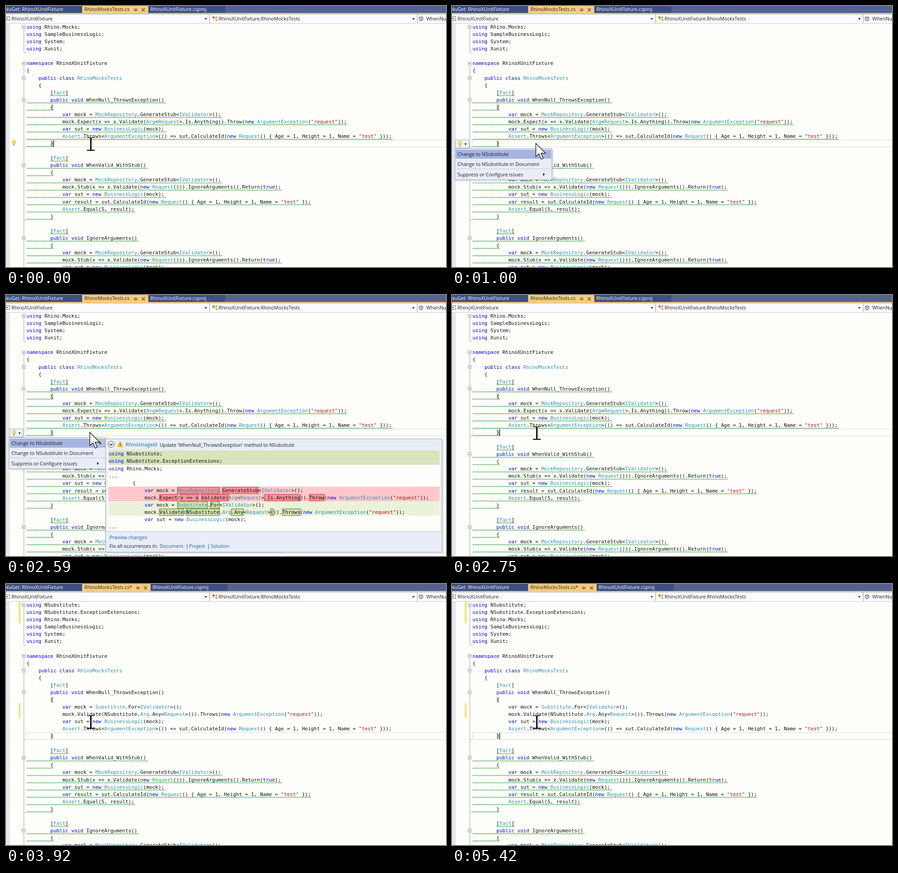
Recreate the animation shown at these times as an HTML page. Size 971 by 576 pixels, loop 5500 ms.

```html
<!DOCTYPE html>
<html lang="en">
<head>
<meta charset="utf-8">
<title>Code fix</title>
<style>
html, body { margin: 0; width: 100%; height: 100%; overflow: hidden; background: #fefffb; }
svg { display: block; width: 100vw; height: 100vh; }
text { white-space: pre; }
.code { font: 10.98px "DejaVu Sans Mono", monospace; fill: #111; }
.ui { font: 10.75px "Open Sans", "Noto Sans", sans-serif; fill: #1e1e1e; }
</style>
</head>
<body>
<svg id="stage" viewBox="0 0 971 576" xmlns="http://www.w3.org/2000/svg"></svg>
<script>
const LOOP = 5500, CHAR = 6.61, PITCH = 16.06, LEFT = 45.2, TOP = 46.3;
const PAPER = '#fefffb', PANEL = '#e9edf8', EDGE = '#9aa6c4', LINK = '#0e62b0', GRID = '#a5a5a5';
const stage = document.getElementById('stage');

function add(parent, tag, attrs = {}, content) {
  const node = document.createElementNS('http://www.w3.org/2000/svg', tag);
  for (const key in attrs) node.setAttribute(key, attrs[key]);
  if (content !== undefined) node.textContent = content;
  return parent.appendChild(node);
}
const group = parent => add(parent, 'g');
const rect = (g, x, y, width, height, fill, extra) =>
  add(g, 'rect', { x, y, width, height, fill, ...extra });
const path = (g, d, stroke, width = 1, fill = 'none') =>
  add(g, 'path', { d, stroke, fill, 'stroke-width': width });
const label = (g, x, y, text, fill = '#1e1e1e', extra) =>
  add(g, 'text', { class: 'ui', x, y, style: `fill:${fill}`, ...extra }, text);
const rowY = row => TOP + row * PITCH;

// Syntax-coloured code
const KEYWORDS = /^(using|namespace|public|class|void|var|new|true)$/;
const TYPES = /^(RhinoMocksTests|Fact|MockRepository|IValidator|Arg|Request|ArgumentException|BusinessLogic|Assert|Substitute)$/;

function colorOf(token) {
  if (token[0] === '"') return '#a31515';
  if (KEYWORDS.test(token)) return '#0000d8';
  return TYPES.test(token) ? '#2b91af' : '#111';
}

function codeLine(g, left, y, source) {
  const body = source.trimStart();
  const x = left + (source.length - body.length) * CHAR;
  const text = add(g, 'text', { class: 'code', x, y: y + 3.8 });
  for (const token of body.match(/"[^"]*"|\w+|[^\w"]+/g) || [])
    add(text, 'tspan', { fill: colorOf(token) }, token);
}

function squiggle(g, from, to, y) {
  let d = `M${from} ${y + 8.2}`;
  for (let x = from; x < to; x += 4) d += 'l2 -2.6l2 2.6';
  path(g, d, '#3f9f46', 1);
}

const INDENT = ' '.repeat(8), BODY = ' '.repeat(12);
const USINGS = ['using Rhino.Mocks;', 'using SampleBusinessLogic;', 'using System;', 'using Xunit;'];
const NEW_USINGS = ['using NSubstitute;', 'using NSubstitute.ExceptionExtensions;'];
const HEAD = ['', 'namespace RhinoXUnitFixture', '{', '    public class RhinoMocksTests', '    {'];
const MAKE_STUB = 'var mock = MockRepository.GenerateStub<IValidator>();';
const EXPECT = 'mock.Expect(x => x.Validate(Arg<Request>.Is.Anything)).Throw(new ArgumentException("request"));';
const MAKE_SUB = 'var mock = Substitute.For<IValidator>();';
const VALIDATE = 'mock.Validate(NSubstitute.Arg.Any<Request>()).Throws(new ArgumentException("request"));';
const MAKE_SUT = 'var sut = new BusinessLogic(mock);';
const STUB = 'mock.Stub(x => x.Validate(new Request())).IgnoreArguments().Return(true);';
const CALL = 'sut.CalculateId(new Request() { Age = 1, Height = 1, Name = "test" })';

const method = (name, lines) => [
  INDENT + '[Fact]', `${INDENT}public void ${name}()`, INDENT + '{',
  ...lines.map(line => BODY + line), INDENT + '}', ''
];

function minus(g, y) {
  rect(g, 35.5, y - 3.5, 7, 7, PAPER, { stroke: GRID });
  path(g, `M37 ${y}h4`, '#444');
}

function usingOutline(g, first, last) {
  const end = rowY(last) + 8;
  path(g, `M39.5 ${rowY(first)}V${end}h4`, GRID);
  minus(g, rowY(first));
}

// The whole source file; shift counts the lines inserted at the top
function buildDocument(shift, usings, firstLines) {
  const root = group(stage), back = group(root);
  const firstWaves = group(root), waves = group(root), text = group(root);
  const methods = [
    method('WhenNull_ThrowsException', [...firstLines, MAKE_SUT, `Assert.Throws<ArgumentException>(() => ${CALL});`]),
    method('WhenValid_WithStub', [MAKE_STUB, STUB, MAKE_SUT, `var result = ${CALL};`, 'Assert.Equal(5, result);']),
    method('IgnoreArguments', [MAKE_STUB, STUB, MAKE_SUT])
  ];
  const lines = [...usings, ...HEAD];
  const starts = methods.map(block => {
    const start = lines.length;
    lines.push(...block);
    return start;
  });

  const closing = rowY(16 + shift);
  rect(back, 45.5, closing - 7.5, 940, 15, 'none', { stroke: '#dfe1ec', 'stroke-width': 1.3 });
  for (const row of [11, 16])
    rect(back, LEFT + 8 * CHAR, rowY(row + shift) - 7, CHAR, 14, '#dde0cf');

  path(back, `M39.5 ${rowY(5 + shift)}V576`, GRID);
  for (const row of [16, 26]) path(back, `M39.5 ${rowY(row + shift) + 8}h4`, GRID);
  for (const row of [5, 7, 10, 19, 29]) minus(back, rowY(row + shift));

  lines.forEach((line, row) => {
    const y = rowY(row);
    if (y > 590) return;
    codeLine(text, LEFT, y, line);
    if (row < starts[0] || !line) return;
    const from = starts.includes(row) ? LEFT + 8 * CHAR : LEFT;
    squiggle(row < starts[1] ? firstWaves : waves, from, LEFT + line.length * CHAR, y);
  });
  const caret = rect(root, 104.6, closing - 7, 1.3, 15, '#000');
  return { root, back, firstWaves, caret };
}

rect(stage, 0, 0, 971, 576, PAPER);
rect(stage, 0, 38, 8.5, 538, '#e6e7ea');

const before = buildDocument(0, USINGS, [MAKE_STUB, EXPECT]);
usingOutline(before.back, 0, 3);
const after = buildDocument(2, [...NEW_USINGS, ...USINGS], [MAKE_SUB, VALIDATE]);
const oldOutline = group(after.back), newOutline = group(after.back);
usingOutline(oldOutline, 2, 5);
usingOutline(newOutline, 0, 5);
rect(after.back, 28, 39, 4, 47.5, '#f5e56b');
rect(after.back, 28, rowY(14) - 8, 4, 32, '#f5e56b');

// Tabs
function buildTabs(mark, grow) {
  const g = group(stage);
  rect(g, 0, 0, 971, 16, '#53628f');
  rect(g, 0, 0, 484 + grow, 16, '#3b4f81');
  rect(g, 168, 0, 146 + grow, 16, '#f5cc84');
  label(g, 126, 10.5, 'NuGet: RhinoXUnitFixture', '#fff', { 'text-anchor': 'end' });
  label(g, 173, 10.8, 'RhinoMocksTests.cs' + mark, '#2b2410');
  label(g, 318.5 + grow, 10.5, 'RhinoXUnitFixture.csproj', '#fff');
  const x = 281.5 + grow;
  path(g, `M${x} 8.5h3M${x + 3} 5.5v6M${x + 3} 6.5h4.5v4h-4.5M${x + 3} 9.8h4.5`, '#5f4a1c');
  path(g, `M${x + 18} 5l7 7m0 -7l-7 7`, '#5f4a1c', 1.4);
  return g;
}
const cleanTabs = buildTabs('', 0), dirtyTabs = buildTabs('*', 5);

// Navigation bar
const nav = group(stage);
rect(nav, 0, 15.5, 971, 2.5, '#f5cc84');
rect(nav, 0, 18, 971, 20.5, '#fbfcfe');
path(nav, 'M0 18.5H971M0 38.5H971', '#c3cadb');
path(nav, 'M449.5 18V38M907.5 18V38', '#8d98b5');
for (const x of [438, 896]) path(nav, `M${x} 27h6l-3 3.2z`, 'none', 0, '#1e1e1e');
rect(nav, -3, 23.5, 11, 8.5, '#fff', { stroke: '#5d6570' });
path(nav, 'M1 25.5l4 2.3l-4 2.3z', 'none', 0, '#388a34');
label(nav, 12, 32, 'RhinoXUnitFixture');
path(nav, 'M457 26L461 30H465M460 26H464', '#c27d1a');
path(nav, 'M454.5 25.5l3.5 -3.5l3 3l-3.5 3.5zM462 25l2 -2l2.5 2l-2 2zM462.5 31l2 -2l2.5 2l-2 2z', 'none', 0, '#c27d1a');
label(nav, 469, 32, 'RhinoXUnitFixture.RhinoMocksTests');
path(nav, 'M916 23.5l4 2v5l-4 2l-4 -2v-5zM912 25.5l4 2l4 -2M916 27.5v5', '#7a4ea8', 1.2);
label(nav, 927.5, 32, 'WhenNull_ThrowsException');

// Light bulb, menu and preview
function bulb(g, y) {
  add(g, 'circle', { cx: 17.5, cy: y - 2, r: 4, fill: '#ffd75a', stroke: '#eebb32' });
  path(g, `M15.5 ${y + 3.2}h4M16 ${y + 5.2}h3`, '#6b6b6b', 1.1);
}
const idleBulb = group(stage);
bulb(idleBulb, 302);

const menu = group(stage);
rect(menu, 7.5, 295.5, 30, 18, '#f0f3fb', { stroke: EDGE });
bulb(menu, 304.5);
path(menu, 'M27 303.5h6l-3 3.2z', 'none', 0, '#1e1e1e');
rect(menu, 9, 317, 215, 70, '#000', { opacity: 0.1 });
rect(menu, 6.5, 314.5, 214, 69, PANEL, { stroke: EDGE });
rect(menu, 8, 317, 211, 20, '#a7b4e0');
label(menu, 12, 331.3, 'Change to NSubstitute');
label(menu, 12, 352.5, 'Change to NSubstitute In Document');
path(menu, 'M10 359.5H217', '#bfc7dc');
label(menu, 12, 375.8, 'Suppress or Configure issues');
path(menu, 'M201 368.5v6.5l4 -3.25z', 'none', 0, '#1e1e1e');

const preview = group(stage);
rect(preview, 196.5, 317.5, 21, 19, '#b4bfe6', { stroke: '#d9b877' });
path(preview, 'M206.5 324v6.5l4 -3.25z', 'none', 0, '#1e1e1e');
rect(preview, 223, 321, 743, 250, '#000', { opacity: 0.1 });
rect(preview, 219.5, 317.5, 742.5, 250, PANEL, { stroke: EDGE });
add(preview, 'circle', { cx: 232, cy: 329.5, r: 6.8, fill: '#fff', stroke: '#444' });
path(preview, 'M228.8 328l3.2 3.4l3.2 -3.4', '#222', 1.7);
path(preview, 'M252 323.5l6 11.5h-12z', '#e0ad16', 1, '#ffcc2e');
path(preview, 'M252 327v4.2M252 332.4v1.4', '#222', 1.4);
label(preview, 264, 334.3, 'RhinoUsageId', LINK);
label(preview, 339, 334.8, "Update 'WhenNull_ThrowsException' method to NSubsitute");
rect(preview, 224, 342, 734, 179, PAPER);
path(preview, 'M220 522.5H962', '#bfc7dc');

const diffY = row => 350.6 + row * PITCH;
const DIFF_LEFT = 226.5;
const band = (row, count, fill) => rect(preview, 226, diffY(row) - 8, 731, count * PITCH, fill);
band(0, 2, '#d7e4bc');
band(5, 2, '#ffc8cb');
band(7, 2, '#eaf2da');

// Each span is [column, length]
const WORDS = [
  [5, [[23, 14], [38, 12]]],
  [6, [[17, 6], [24, 6], [31, 9], [52, 12], [67, 5]]],
  [7, [[23, 10], [34, 3]]],
  [8, [[17, 8], [26, 11], [41, 4], [54, 1], [58, 6]]]
];
for (const [row, spans] of WORDS) {
  const [fill, stroke] = row < 7 ? ['#f9939a', '#d9505f'] : ['#d4e3b2', '#71933a'];
  for (const [col, length] of spans)
    rect(preview, DIFF_LEFT + col * CHAR, diffY(row) - 7, length * CHAR, 14.5, fill, { stroke, 'stroke-width': 1.4 });
}
[...NEW_USINGS, USINGS[0], '...', INDENT + '{', BODY + MAKE_STUB, BODY + EXPECT,
  BODY + MAKE_SUB, BODY + VALIDATE, BODY + MAKE_SUT, '...'
].forEach((line, row) => codeLine(preview, DIFF_LEFT, diffY(row), line));

label(preview, 228.5, 539, 'Preview changes', LINK);
label(preview, 228.5, 558, 'Fix all occurrences in:');
for (const [x, text] of [[339, 'Document'], [404, 'Project'], [451.5, 'Solution']])
  label(preview, x, 558, text, LINK);
for (const x of [396.5, 444]) label(preview, x, 558, '|');

// Pointers
const beam = group(stage);
path(beam, 'M179.5 290.5h4.5q3 0 3.2 3q.2 -3 3.2 -3h4.5', '#111', 1.6);
path(beam, 'M187.2 292V318', '#000', 3);
path(beam, 'M178.5 318.5h17.5', '#000', 2.2);
const arrow = path(group(stage), 'M185 303V332.5L191.8 326.2L196.8 338L201.3 336L196.3 324.8H206.5Z', '#000', 1.2, '#fff');

const MENU_OPEN = 500, PREVIEW_OPEN = 1080, PICKED = 2670, APPLIED = 2920;
const OUTLINED = 3500, CLEARED = 3920, BLINK = 530;
const show = (node, on) => node.setAttribute('visibility', on ? 'inherit' : 'hidden');

function update(t) {
  const applied = t >= APPLIED;
  const menuOpen = t >= MENU_OPEN && t < PICKED;
  show(before.root, !applied);
  show(after.root, applied);
  show(cleanTabs, !applied);
  show(dirtyTabs, applied);
  show(idleBulb, t < MENU_OPEN);
  show(menu, menuOpen);
  show(preview, t >= PREVIEW_OPEN && t < PICKED);
  show(arrow, menuOpen);
  show(beam, !menuOpen);
  show(before.caret, !menuOpen);
  show(after.caret, Math.floor((t - APPLIED) / BLINK) % 2 === 0);
  show(oldOutline, t < OUTLINED);
  show(newOutline, t >= OUTLINED);
  show(after.firstWaves, t < CLEARED);
}

const begin = performance.now();
function frame() {
  update((performance.now() - begin) % LOOP);
  requestAnimationFrame(frame);
}
update(0);
requestAnimationFrame(frame);
</script>
</body>
</html>
```
